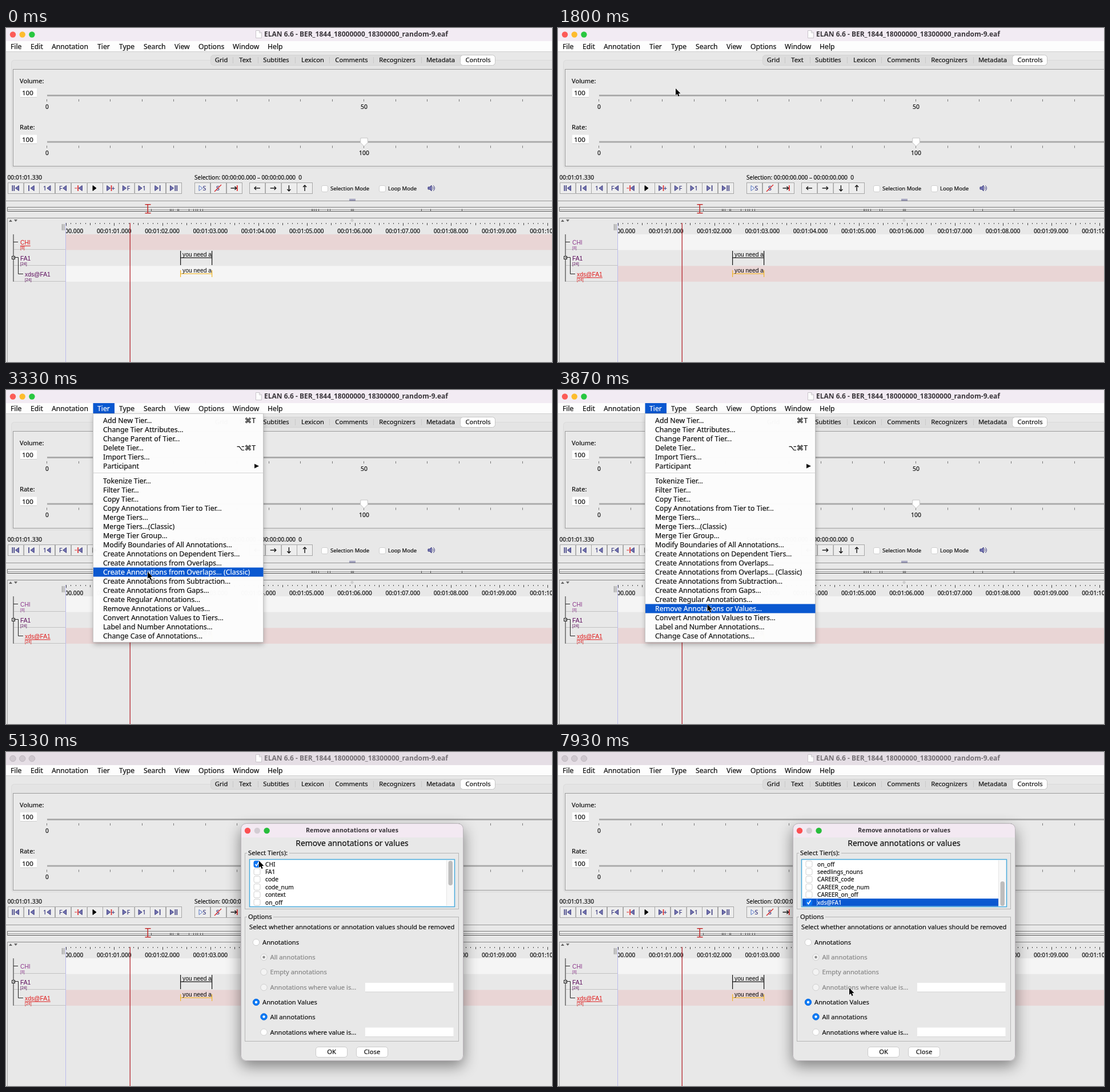
An HTML page with a canvas that plays this animation: 956x586 px, repeating every 8000 ms.

```html
<!DOCTYPE html>
<html lang="en">
<head>
<meta charset="utf-8">
<title>Removing annotation values</title>
<style>
html, body { margin: 0; width: 100%; height: 100%; overflow: hidden; background: #e8e8e8; }
canvas { display: block; }
</style>
</head>
<body>
<canvas id="stage" width="956" height="586"></canvas>
<script>
const c = document.getElementById('stage').getContext('2d');
const LOOP = 8000;
const UI = '"Noto Sans", "Open Sans", sans-serif';
const ARIAL = '"Liberation Sans", Arial, sans-serif';
const BLUE = '#0a58d0', INK = '#111', GREY = '#868686', NAVY = '#39397f';

const TIME = { activate: 1070, menuOpen: 2270, menuClose: 4130, dialog: 4330, uncheck: 5330,
  scrollFrom: 5600, scrollTo: 6200, check: 7200 };

// time, x, y of the pointer tip
const POINTER = [
  [130, 300, 600], [600, 140, 500], [930, 56, 430], [1330, 56, 430], [1800, 206, 106],
  [2200, 172, 32], [2600, 172, 32], [3330, 248, 319], [3700, 261, 376], [4200, 263, 377],
  [4400, 263, 377], [5130, 443, 191], [5400, 443, 191], [5800, 471, 239], [6670, 471, 239],
  [7130, 440, 262], [7730, 440, 262], [7930, 510, 414]
];

const MENUS = [['File', 8], ['Edit', 43], ['Annotation', 80], ['Tier', 160], ['Type', 198],
  ['Search', 241], ['View', 295], ['Options', 337], ['Window', 397], ['Help', 458]];
const TABS = [['Grid', 377], ['Text', 419], ['Subtitles', 473], ['Lexicon', 537], ['Comments', 605],
  ['Recognizers', 685], ['Metadata', 761], ['Controls', 826.5]];
const TIER_MENU = ['Add New Tier...', 'Change Tier Attributes...', 'Change Parent of Tier...',
  'Delete Tier...', 'Import Tiers...', 'Participant', 'Tokenize Tier...', 'Filter Tier...',
  'Copy Tier...', 'Copy Annotations from Tier to Tier...', 'Merge Tiers...',
  'Merge Tiers...(Classic)', 'Merge Tier Group...', 'Modify Boundaries of All Annotations...',
  'Create Annotations on Dependent Tiers...', 'Create Annotations from Overlaps...',
  'Create Annotations from Overlaps... (Classic)', 'Create Annotations from Subtraction...',
  'Create Annotations from Gaps...', 'Create Regular Annotations...',
  'Remove Annotations or Values...', 'Convert Annotation Values to Tiers...',
  'Label and Number Annotations...', 'Change Case of Annotations...'];
const TIERS = ['CHI', 'FA1', 'code', 'code_num', 'context', 'on_off', 'seedlings_nouns',
  'CAREER_code', 'CAREER_code_num', 'CAREER_on_off', 'xds@FA1'];
const DENSITY = [254, 287, 289, 292, 300, 302, 320, 328, 332, 335, 340, 344, 535, 537, 540, 543,
  547, 563, 567, 604, 606, 608, 727, 743, 798];

function rect(x, y, w, h, color) {
  c.fillStyle = color;
  c.fillRect(x, y, w, h);
}
function round(x, y, w, h, r, fill, stroke) {
  c.beginPath();
  c.roundRect(x, y, w, h, r);
  if (fill) { c.fillStyle = fill; c.fill(); }
  if (stroke) { c.strokeStyle = stroke; c.lineWidth = 1; c.stroke(); }
}
function circle(x, y, r, fill, stroke) {
  round(x - r, y - r, 2 * r, 2 * r, r, fill, stroke);
}
function poly(points, fill, stroke, width = 1, close = true) {
  c.beginPath();
  points.forEach(([x, y]) => c.lineTo(x, y));
  if (close) c.closePath();
  if (fill) { c.fillStyle = fill; c.fill(); }
  if (stroke) { c.strokeStyle = stroke; c.lineWidth = width; c.stroke(); }
}
const line = (points, color, width = 1) => poly(points, null, color, width, false);

function text(s, x, y, size, color = INK, { align = 'left', family = UI, weight = 400 } = {}) {
  c.font = `${weight} ${size}px ${family}`;
  c.textAlign = align;
  c.fillStyle = c.strokeStyle = color;
  c.lineWidth = 0.2;
  c.fillText(s, x, y);
  if (family === UI && weight === 400) c.strokeText(s, x, y);
}
const centered = (s, x, y, size, color, weight) => text(s, x, y, size, color, { align: 'center', weight });

function clipped(x, y, w, h, draw) {
  c.save();
  c.beginPath();
  c.rect(x, y, w, h);
  c.clip();
  draw();
  c.restore();
}

function titleBar(active) {
  rect(0, 0, 956, 23, active ? '#f2ebf3' : '#e5dee5');
  const lights = active ? ['#fc5b57', '#fdbc2e', '#29c740'] : ['#cfc8cf', '#cfc8cf', '#cfc8cf'];
  lights.forEach((color, i) => circle(12 + 16.7 * i, 11.5, 5.2, color, active ? null : '#bdb6bd'));
  poly([[437.5, 4.5], [443.5, 4.5], [447.5, 8.5], [447.5, 17.5], [437.5, 17.5]], '#fff', '#c9c4ca');
  line([[443.5, 4.5], [443.5, 8.5], [447.5, 8.5]], '#c9c4ca');
  text('ELAN 6.6 - BER_1844_18000000_18300000_random-9.eaf', 452, 15.3, 12,
    active ? '#39353a' : '#757075', { weight: 700 });
}

function menuBar(open) {
  rect(0, 23, 956, 18, '#fdfdfd');
  rect(0, 41, 956, 1, '#cfcfcf');
  if (open) rect(152.5, 23, 37.5, 18.5, BLUE);
  MENUS.forEach(([name, x]) => text(name, x, 37, 12.2, open && name === 'Tier' ? '#fff' : INK));
}

function slider(y, label, marks) {
  text(label, 24, y - 21.5, 11.1);
  rect(25, y - 12, 29, 15, '#fff');
  rect(25, y + 3, 29, 1, '#d0d0d0');
  text('100', 28, y, 11.5);
  rect(72, y - 1, 884, 2.8, '#a9a9a9');
  for (let i = 0; i < 16; i++) rect(71 + Math.round(55.5 * i), y + 7, 1, 4, '#777');
  centered('0', 72, y + 23.5, 10.2);
  centered(marks, 627, y + 23.5, 10.4);
}

function controls() {
  rect(0, 42, 956, 544, '#e8e8e8');
  round(9.5, 56.5, 960, 189, 5, '#e4e4e4', '#dadada');
  round(358.5, 47.5, 498, 18, 5, '#dcdcdc', '#d3d3d3');
  [397, 441, 506, 566, 643, 727].forEach(x => rect(x, 51, 1, 11, '#c8c8c8'));
  round(795.5, 47.5, 61, 18, 5, '#fff', '#c6c6c6');
  TABS.forEach(([name, x]) => centered(name, x, 60.3, 11.2));
  c.fillStyle = '#e9e9e9';
  c.fillRect(12, 72, 950, 171);
  c.strokeStyle = '#9b9b9b';
  c.lineWidth = 1;
  c.strokeRect(12.5, 72.5, 950, 170);
  slider(118, 'Volume:', '50');
  slider(199.5, 'Rate:', '100');
  poly([[621, 193], [633, 193], [633.5, 201], [627, 207.5], [620.5, 201]], '#fff', '#c4c4c4');
}

function buttonRow(x, count, width) {
  for (let i = 0; i < count; i++) {
    c.fillStyle = '#ededed';
    c.fillRect(x + i * width, 271, width, 20);
    c.strokeStyle = '#a6a6a6';
    c.lineWidth = 1;
    c.strokeRect(Math.round(x + i * width) + .5, 271.5, Math.round(width) - 1, 19);
  }
}
// a play triangle centred on x, pointing right (1) or left (-1)
function triangle(x, dir, color = '#7777b4', edge = NAVY) {
  poly([[x - 3 * dir, 276.5], [x + 3 * dir, 281], [x - 3 * dir, 285.5]], color, edge);
}
const stop = (x, color = NAVY) => rect(x, 276, 1.6, 10, color);
const glyph = (s, x, color = NAVY) => centered(s, x, 284.8, 10.5, color);

function arrow(x, angle) {
  c.save();
  c.translate(x, 281);
  c.rotate(angle);
  line([[-5, 0], [5, 0]], INK, 1.4);
  line([[2, -3], [5, 0], [2, 3]], INK, 1.4);
  c.restore();
}

function transport() {
  text('00:01:01.330', 2.5, 265.8, 10.2);
  text('Selection: 00:00:00.000 – 00:00:00.000  0', 330, 265.8, 10);
  buttonRow(3, 11, 27.7);
  buttonRow(330, 3, 28);
  buttonRow(426, 4, 27.8);
  const at = i => 16.5 + 27.7 * i;
  stop(at(0) - 6); stop(at(0) - 3); triangle(at(0) + 3, -1);
  stop(at(1) - 5); triangle(at(1) + 2, -1);
  glyph('1', at(2) - 4); triangle(at(2) + 3, -1);
  glyph('F', at(3) - 4); triangle(at(3) + 3, -1);
  rect(at(4) - 7, 280.5, 4, 1, '#d22'); stop(at(4) - 2, '#d22'); triangle(at(4) + 3, -1);
  triangle(at(5), 1, '#000', '#000');
  triangle(at(6) - 3, 1); stop(at(6) + 1, '#d22'); glyph('+', at(6) + 5);
  triangle(at(7) - 3, 1); glyph('F', at(7) + 4);
  triangle(at(8) - 3, 1); glyph('1', at(8) + 4);
  triangle(at(9) - 2, 1); stop(at(9) + 3);
  triangle(at(10) - 3, 1); stop(at(10) + 2); stop(at(10) + 5);
  triangle(341, 1, '#eef', '#5577bb'); glyph('S', 347.5);
  glyph('S', 371); line([[365, 287], [377, 275]], '#d22', 1.2);
  arrow(398.5, 0); stop(404, '#d22');
  [Math.PI, 0, Math.PI / 2, -Math.PI / 2].forEach((angle, i) => arrow(440 + 27.7 * i, angle));
  [[552, 'Selection Mode'], [653, 'Loop Mode']].forEach(([x, label]) => {
    round(x + .5, 276.5, 11, 11, 2.5, '#fff', '#cfcfcf');
    text(label, x + 16, 285, 9.45);
  });
  poly([[739, 279], [742, 279], [745, 276], [745, 286], [742, 283], [739, 283]], '#7777b4', NAVY);
  [2, 4.5].forEach(r => {
    c.beginPath();
    c.arc(745, 281, r + 1, -1, 1);
    c.strokeStyle = NAVY;
    c.stroke();
  });
}

function density() {
  rect(0, 303, 956, 1, '#8d8d8d');
  rect(0, 304, 956, 1, '#f5f5f5');
  [300, 302].forEach(y => rect(601, y, 11, 1, '#6c6c9c'));
  rect(2, 314, 954, 1, '#777');
  rect(2, 315, 954, 6, '#ececec');
  rect(2, 318, 954, 1, '#999');
  rect(2, 321, 954, 1, '#555');
  rect(2, 314, 1, 8, '#777');
  DENSITY.forEach(x => rect(x, 317.5, 1, 4, '#555'));
  rect(247.5, 309, 1.4, 16, '#c02020');
  [309, 324].forEach(y => rect(243.5, y, 10, 1.4, '#c02020'));
  rect(2, 333, 954, 1, '#888');
  rect(2, 333, 1, 253, '#a0a0a0');
  poly([[5, 340], [11, 340], [8, 336]], '#666');
  poly([[14, 336], [20, 336], [17, 340]], '#666');
  circle(606, 337.5, 2, '#d2d2d2', '#c5c5c5');
}

function tierLabel(name, count, x, y, color, active) {
  const ink = active ? '#e01818' : color;
  text(name, x, y, 10.3, ink, { family: ARIAL });
  if (active) rect(x, y + 1.5, c.measureText(name).width, 1, ink);
  text(count, x, y + 8, 7, ink, { family: ARIAL });
}

function annotation(top, y, bottom, color, baseline) {
  rect(305, top, 1.2, bottom - top, color);
  rect(360, top, 1.2, bottom - top, color);
  rect(305, y, 56, 1.2, color);
  clipped(306, baseline - 10, 55, 14, () => text('you need a', 309, baseline, 10.3, '#000', { family: ARIAL }));
}

function timeline(active) {
  clipped(105, 334, 851, 252, () => {
    for (let i = 0; i < 102; i++) {
      const major = i % 10 === 0;
      rect(Math.round(105 + 8.43 * i), 342, 1, major ? 5 : i % 5 ? 2 : 4, '#444');
    }
    for (let i = 0; i < 11; i++) {
      centered(`00:01:${String(i).padStart(2, '0')}.000`, 105 + 84.25 * i, 360, 10.2);
    }
    ['#f5f5f5', '#e8e8e8', '#f5f5f5'].forEach((color, i) =>
      rect(105, 362 + 27.7 * i, 851, 27.7, i === active ? '#e9d5d5' : color));
  });
  rect(104, 342, 1, 244, '#bcbcec');
  [98, 101].forEach(x => rect(x, 344, 1, 11, '#777'));
  [388, 416, 444].forEach(y => rect(14, y, 90, 1, '#c2c2c2'));
  line([[13, 362], [13, 445]], '#222');
  line([[13, 375.5], [21, 375.5]], '#222');
  line([[13, 402.5], [21.5, 402.5], [21.5, 431.5], [30, 431.5]], '#222');
  c.fillStyle = '#e8e8e8';
  c.fillRect(10, 400, 5, 5);
  c.strokeRect(10.5, 400.5, 5, 5);
  rect(12, 402.5, 3, 1, '#222');
  tierLabel('CHI', '[8]', 25, 380.3, '#8e3a8e', active === 0);
  tierLabel('FA1', '[24]', 25, 408, '#5c0b5c', false);
  tierLabel('xds@FA1', '[24]', 33, 436, '#5c0b5c', active === 2);
  annotation(391, 402.5, 416, '#111', 400.5);
  annotation(425, 430.5, 437, '#f0b629', 428.5);
  rect(216.6, 342, 1.3, 244, '#b42a30');
}

function tierMenu(pointerY) {
  c.save();
  c.shadowColor = 'rgba(0,0,0,.3)';
  c.shadowBlur = 9;
  c.shadowOffsetY = 3;
  c.globalAlpha = .97;
  rect(152.5, 42, 298, 400.5, '#fff');
  c.restore();
  c.strokeStyle = '#c4c4c4';
  c.lineWidth = 1;
  c.strokeRect(152.5, 41.5, 298, 401);
  rect(153, 145, 297, 1, '#d4d4d4');
  TIER_MENU.forEach((label, i) => {
    const y = 53.5 + 16 * i + (i > 5 ? 10 : 0);
    const hover = Math.abs(pointerY - y) <= 8;
    const color = hover ? '#fff' : INK;
    if (hover) rect(153, y - 8, 297.5, 16, BLUE);
    text(label, 170, y + 4.4, 12.35, color);
    if (i === 0) text('⌘T', 437, y + 4.4, 12.3, color, { align: 'right' });
    if (i === 3) text('⌥⌘T', 437, y + 4.4, 12.3, color, { align: 'right' });
    if (i === 5) poly([[435, y - 4], [443, y], [435, y + 4]], color);
  });
}

function checkbox(x, y, checked) {
  round(x - 5.5, y - 5.5, 11, 11, 2.5, checked ? '#0a74f5' : '#fff', checked ? '#0a6ae0' : '#cfcfcf');
  if (checked) line([[x - 3, y], [x - 1, y + 3], [x + 3, y - 3.5]], '#fff', 1.7);
}
function radio(x, y, label, on, enabled = true) {
  circle(x, y, 5.7, on && enabled ? '#0a7af5' : enabled ? '#fff' : '#f3f3f3', on && enabled ? '#0a6ae0' : '#cfcfcf');
  if (on) circle(x, y, 2.2, enabled ? '#fff' : '#8c8c8c');
  text(label, x + 11, y + 4, 11.2, enabled ? INK : GREY);
}
function group(x, y, w, h, label, labelWidth) {
  c.strokeStyle = '#b5b5b5';
  c.lineWidth = 1;
  c.strokeRect(x + .5, y + .5, w, h);
  rect(x + 4, y, labelWidth, 1, '#e8e8e8');
  text(label, x + 6, y + 4, 11.2);
}
function pushButton(x, label) {
  round(x + .5, 517.5, 55, 18, 4.5, '#fff', '#cbcbcb');
  centered(label, x + 28, 530.2, 11.2);
}

function tierList(t, scroll) {
  rect(427, 189, 358, 82, '#fff');
  clipped(427, 190, 344, 81, () => TIERS.forEach((name, i) => {
    const y = 196.7 + 13.4 * (i - 5 * scroll);
    const last = i === TIERS.length - 1;
    const selected = i === 0 ? t >= TIME.uncheck && t < TIME.check : last && t >= TIME.check;
    if (selected) rect(428, y - 6.5, 343, 13.4, BLUE);
    checkbox(439.5, y, i === 0 ? t < TIME.uncheck : last && t >= TIME.check);
    if (selected) rect(453, y - 6, 1, 12, '#7fb0f5');
    text(name, 454, y + 3.8, 10.2, selected ? '#fff' : INK);
  }));
  rect(771, 190, 14, 80, '#f8f8f8');
  rect(771, 190, 1, 80, '#e6e6e6');
  round(774.5, 191 + 36 * scroll, 7.5, 43, 3.7, '#bdbdbd');
  c.strokeStyle = '#48aadc';
  c.lineWidth = 1.5;
  c.strokeRect(426.5, 188.5, 359, 83);
}

function dialog(t) {
  c.save();
  c.shadowColor = 'rgba(0,0,0,.45)';
  c.shadowBlur = 26;
  c.shadowOffsetY = 9;
  round(411, 126, 390, 416, 9, '#e8e8e8');
  c.restore();
  round(411, 126, 390, 24, [9, 9, 0, 0], '#f3e9f2');
  round(411.5, 125.5, 389, 416, 9, null, '#b9b4b9');
  ['#fc4f52', '#d3ccd3', '#28bd3c'].forEach((color, i) => circle(423 + 16.8 * i, 138, 5.2, color));
  centered('Remove annotations or values', 606, 141.3, 10.7, '#39353a', 700);
  centered('Remove annotations or values', 606, 165, 13.9);
  group(418, 177, 374, 98, 'Select Tier(s):', 74);
  const p = Math.min(1, Math.max(0, (t - TIME.scrollFrom) / (TIME.scrollTo - TIME.scrollFrom)));
  tierList(t, p * p * (3 - 2 * p));
  group(418, 289, 374, 218, 'Options', 46);
  text('Select whether annotations or annotation values should be removed', 426, 310.5, 11.2);
  radio(438, 334, 'Annotations', false);
  radio(451.5, 360, 'All annotations', true, false);
  radio(451.5, 386, 'Empty annotations', false, false);
  radio(451.5, 413, 'Annotations where value is...', false, false);
  radio(438, 439, 'Annotation Values', true);
  radio(451.5, 464.5, 'All annotations', true);
  radio(451.5, 491.5, 'Annotations where value is...', false);
  [405, 483.5].forEach(y => {
    rect(629, y, 154.5, 15.5, '#fff');
    rect(629, y + 15.5, 154.5, 1, '#d8d8d8');
  });
  pushButton(542, 'OK');
  pushButton(613, 'Close');
}

function pointerAt(t) {
  if (t < POINTER[0][0]) return null;
  const i = POINTER.findIndex(key => key[0] > t);
  if (i < 0) return POINTER[POINTER.length - 1].slice(1);
  const [t0, x0, y0] = POINTER[i - 1], [t1, x1, y1] = POINTER[i];
  const p = (t - t0) / (t1 - t0), e = p * p * (3 - 2 * p);
  return [x0 + (x1 - x0) * e, y0 + (y1 - y0) * e];
}
function pointer([x, y]) {
  const shape = [[0, 0], [0, 12], [2.7, 9.6], [4.6, 14], [6.6, 13.1], [4.8, 8.9], [8.4, 8.7]];
  poly(shape.map(([dx, dy]) => [x + dx, y + dy]), '#000', '#fff', 1);
  poly(shape.map(([dx, dy]) => [x + dx, y + dy]), '#000');
}

function draw(t) {
  const tip = pointerAt(t);
  const showDialog = t >= TIME.dialog;
  titleBar(!showDialog);
  menuBar(t >= TIME.menuOpen && !showDialog);
  controls();
  transport();
  density();
  timeline(t < TIME.activate ? 0 : 2);
  if (t >= TIME.menuOpen && t < TIME.menuClose) tierMenu(tip[1]);
  if (showDialog) dialog(t);
  if (tip) pointer(tip);
}

function tick() {
  draw(performance.now() % LOOP);
  requestAnimationFrame(tick);
}
tick();
</script>
</body>
</html>
```
